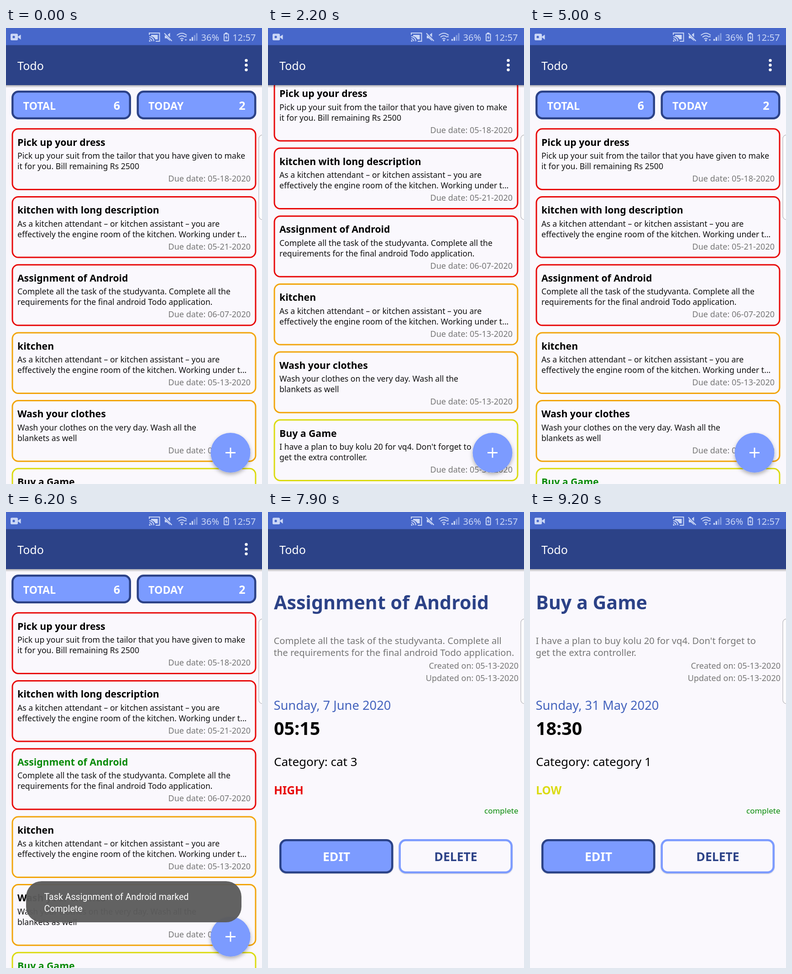
Write an HTML page that moves like this. It is 561 px wide and 998 px high and loops after 9.3 s.

```html
<!DOCTYPE html>
<html lang="en">
<head>
<meta charset="utf-8">
<title>Todo</title>
<style>
html, body { margin: 0; width: 100%; height: 100%; overflow: hidden; background: #faf8fd; }
svg { display: block; width: 561px; height: 998px; }
text { font-family: "Noto Sans", "Open Sans", sans-serif; white-space: pre; }
.toast text { font-family: Roboto, sans-serif; font-size: 19.6px; fill: #fff; }
</style>
</head>
<body>
<svg id="stage" viewBox="0 0 561 998" xmlns="http://www.w3.org/2000/svg"></svg>
<script>
const LOOP = 9300, STEP = 100, W = 561, SCROLL = 106.5;
const C = {
  bg: '#faf8fd', bar: '#2c4287', status: '#4767ca', light: '#7b9bff', icon: '#cbd7f6',
  grey: '#767676', green: '#078a07', red: '#e80909', orange: '#f2a50c', yellow: '#dbdb10'
};

const tasks = [
  ['Pick up your dress', 'Pick up your suit from the tailor that you have given to make',
    'it for you. Bill remaining Rs 2500', '05-18-2020', C.red],
  ['kitchen with long description', 'As a kitchen attendant – or kitchen assistant – you are',
    'effectively the engine room of the kitchen. Working under t...', '05-21-2020', C.red],
  ['Assignment of Android', 'Complete all the task of the studyvanta. Complete all the',
    'requirements for the final android Todo application.', '06-07-2020', C.red],
  ['kitchen', 'As a kitchen attendant – or kitchen assistant – you are',
    'effectively the engine room of the kitchen. Working under t...', '05-13-2020', C.orange],
  ['Wash your clothes', 'Wash your clothes on the very day. Wash all the',
    'blankets as well', '05-13-2020', C.orange],
  ['Buy a Game', "I have a plan to buy kolu 20 for vq4. Don't forget to",
    'get the extra controller.', '05-31-2020', C.yellow]
];

const text = (x, y, size, fill, str, more = '') =>
  `<text x="${x}" y="${y}" font-size="${size}" fill="${fill}" ${more}>${str}</text>`;
const rect = (x, y, w, h, fill, more = '') =>
  `<rect x="${x}" y="${y}" width="${w}" height="${h}" fill="${fill}" ${more}/>`;
const path = (d, more = '') => `<path d="${d}" ${more}/>`;
const END = 'text-anchor="end"', MID = 'text-anchor="middle"';
const BOLD = 'font-weight="700"', SEMI = 'font-weight="600"';

// Rounded box measured by its outer edges
const box = (x, y, w, h, r, line, stroke, fill) =>
  rect(x + line / 2, y + line / 2, w - line, h - line, fill,
    `rx="${r}" stroke="${stroke}" stroke-width="${line}"`);

function card([title, line1, line2, due, color], i) {
  return `<g transform="translate(0 ${219 + i * 148.7})">` +
    box(12.5, 0.3, 536, 135.6, 13, 3, color, C.bg) +
    text(25, 38.5, 21.2, '#000', title, `${BOLD} id="title${i}"`) +
    text(25, 67, 17.6, '#111', line1) +
    text(25, 90, 17.6, '#111', line2) +
    text(536, 117, 18, C.grey, 'Due date: ' + due, END) + '</g>';
}

const counter = (x, name, n) =>
  box(x, 137, 262, 63, 13, 4.5, C.bar, C.light) +
  text(x + 25.5, 179, 23.2, '#fff', name, SEMI) +
  text(x + 238, 179, 25, '#fff', n, `${SEMI} ${END}`);

const appBar = () =>
  rect(0, 125, W, 6, 'url(#drop)') + rect(0, 0, W, 38, C.status) + rect(0, 37.5, W, 87.5, C.bar) +
  text(25, 92, 25, '#fff', 'Todo');

function listScreen() {
  const dots = [71, 81.3, 91.6].map(y => `<circle cx="526.5" cy="${y}" r="3.2" fill="#fff"/>`).join('');
  return rect(-20, 0, W + 40, 998, C.bg) +
    '<g id="scroll">' + counter(12, 'TOTAL', 6) + counter(286.5, 'TODAY', 2) +
    tasks.map(card).join('') + '</g>' +
    path('M0 998V973Q280 949 561 973V998Z', 'id="glow" fill="#000" fill-opacity=".035"') +
    '<circle cx="492" cy="929.5" r="43.5" fill="' + C.light + '" filter="url(#lift)"/>' +
    path('M481 929.5h22M492 918.5v22', 'stroke="#fff" stroke-width="2.8"') +
    appBar() + dots;
}

const button = (x, label, stroke, fill, ink) =>
  `<g filter="url(#soft)">${box(x, 716, 249.5, 75, 13, 4.5, stroke, fill)}</g>` +
  text(x + 125, 763.5, 26.5, ink, label, `${SEMI} ${MID}`);

function page(x, p) {
  return `<g transform="translate(${x} 0)">` +
    text(13, 213, 41.2, C.bar, p.title, BOLD) +
    text(12.5, 289, 20.2, C.grey, p.line1) +
    text(12.5, 315, 20.2, C.grey, p.line2) +
    text(549, 342.5, 18, C.grey, 'Created on: 05-13-2020', END) +
    text(549, 369.5, 18, C.grey, 'Updated on: 05-13-2020', END) +
    text(12.5, 432.5, 27.3, '#4463bd', p.day) +
    text(13, 488, 39.3, '#000', p.time, BOLD) +
    text(13, 556, 26, '#000', 'Category: ' + p.cat) +
    text(13, 618, 24.5, p.color, p.level, SEMI) +
    text(548.5, 660, 17, C.green, 'complete', END) +
    button(25, 'EDIT', C.bar, C.light, '#fff') +
    button(286.5, 'DELETE', C.light, C.bg, C.bar) + '</g>';
}

const detailScreen = () => rect(0, 0, W, 998, C.bg) + '<g id="pager">' +
  page(0, {
    title: tasks[2][0], line1: 'Complete all the task of the studyvanta. Complete all',
    line2: 'the requirements for the final android Todo application.',
    day: 'Sunday, 7 June 2020', time: '05:15', cat: 'cat 3', level: 'HIGH', color: C.red
  }) +
  page(W, {
    title: tasks[5][0], line1: tasks[5][1], line2: tasks[5][2],
    day: 'Sunday, 31 May 2020', time: '18:30', cat: 'category 1', level: 'LOW', color: C.yellow
  }) + '</g>' + appBar();

function statusIcons() {
  const line = `fill="none" stroke="${C.icon}" stroke-width="2"`;
  const solid = `fill="${C.icon}"`;
  const bars = [0, 1, 2, 3].map(i =>
    rect(402 + i * 4.8, 24 - i * 4.2, 3.2, 4 + i * 4.2, C.icon, `opacity="${i < 2 ? 1 : .45}"`)).join('');
  return rect(10, 12.5, 16, 14.5, C.icon, 'rx="2.5"') + path('M25 19.5l7.5-5v11z', solid) +
    `<circle cx="17" cy="19.7" r="2.6" fill="${C.status}"/>` +
    path('M314 15V11H336.500V29H328M314 19a10 10 0 0 1 10 10M314 23.500a5.500 5.500 0 0 1 5.500 5.500', line) +
    path('M318 15h14.500v10h-5q-3-6-9.500-7z', solid) + `<circle cx="315" cy="28.300" r="1.700" ${solid}/>` +
    path('M348 16.500h4.500l7-6v18l-7-6h-4.500z', solid) +
    path('M347 10.500l17 17.500', `stroke="${C.status}" stroke-width="4.500"`) +
    path('M347 11.500l16.500 17', line) +
    path('M374.500 16q11-9 21.500 0M378 20q7.500-6 14.500 0M381.500 24q4-3 7.500 0', line) +
    `<circle cx="385.500" cy="27" r="2" ${solid}/>` +
    path('M391.500 20l2.500-3 2.500 3zM391.500 25l2.500 3 2.500-3z', solid) + bars +
    text(427.5, 27.5, 20, C.icon, '36%') +
    rect(480, 10, 5, 3, C.icon) + box(477, 12, 11.5, 17, 1, 2, C.icon, 'none') +
    path('M484 15l-4 6h2.500l-1 5 4-6h-2.500z', solid) +
    text(547.5, 27.5, 20, C.icon, '12:57', END);
}

const stage = document.getElementById('stage');
stage.innerHTML = `<defs>
  <linearGradient id="drop" x2="0" y2="1"><stop stop-color="#000" stop-opacity=".3"/>
    <stop offset="1" stop-color="#000" stop-opacity="0"/></linearGradient>
  <filter id="lift" x="-30%" y="-30%" width="160%" height="160%">
    <feDropShadow dx="0" dy="4" stdDeviation="4" flood-opacity=".3"/></filter>
  <filter id="soft" x="-5%" y="-10%" width="110%" height="125%">
    <feDropShadow dx="0" dy="1" stdDeviation="1" flood-opacity=".18"/></filter>
</defs>
<g id="list">${listScreen()}</g>
${rect(0, 0, W, 998, '#000', 'id="dim"')}
<g id="detail">${detailScreen()}</g>
${statusIcons()}
${rect(554, 234, 20, 185.5, '#fdfcfe', 'rx="8" stroke="#b5b5b9" stroke-width="1.2"')}
<g id="toastA" class="toast">${rect(86, 830, 388.5, 68, '#5c5c5c', 'rx="34" fill-opacity=".96"')}
  ${text(280.5, 870.5, 19.6, '#fff', 'Task Buy a Game marked Complete', MID)}</g>
<g id="toastB" class="toast">${rect(44, 808, 472, 90, '#5c5c5c', 'rx="34" fill-opacity=".96"')}
  ${text(83.5, 849, 19.6, '#fff', 'Task Assignment of Android marked')}
  ${text(83.5, 874.5, 19.6, '#fff', 'Complete')}</g>`;

const el = id => document.getElementById(id);
const ramp = (t, a, b) => Math.min(1, Math.max(0, (t - a) / (b - a)));
const smooth = u => u * u * (3 - 2 * u);
const easeOut = (u, k) => 1 - Math.pow(1 - u, k);
const pulse = (t, a, b, c, d) => ramp(t, a, b) * (1 - ramp(t, c, d));
const move = (id, x, y = 0) => el(id).setAttribute('transform', `translate(${x} ${y})`);
const fade = (id, o) => el(id).setAttribute('opacity', o);

function draw(t) {
  const down = smooth(ramp(t, 300, 800)), up = smooth(ramp(t, 4300, 4800));
  move('scroll', 0, -SCROLL * (down - up));
  fade('glow', pulse(t, 600, 850, 950, 1300));

  el('title5').setAttribute('fill', t >= 3000 ? C.green : '#000');
  el('title2').setAttribute('fill', t >= 5500 ? C.green : '#000');
  fade('toastA', pulse(t, 2900, 3200, 4350, 4650));
  fade('toastB', pulse(t, 5400, 5700, 6650, 6965));

  const open = easeOut(ramp(t, 6700, 7200), 2.61);
  move('list', -13.5 * open);
  fade('dim', .14 * open);
  move('detail', W * (1 - open));
  move('pager', -W * smooth(ramp(t, 8300, 9000)));
}

const start = performance.now();
function tick() {
  const t = (performance.now() - start) % LOOP;
  draw(Math.floor(t / STEP) * STEP);
  requestAnimationFrame(tick);
}
tick();
</script>
</body>
</html>
```
